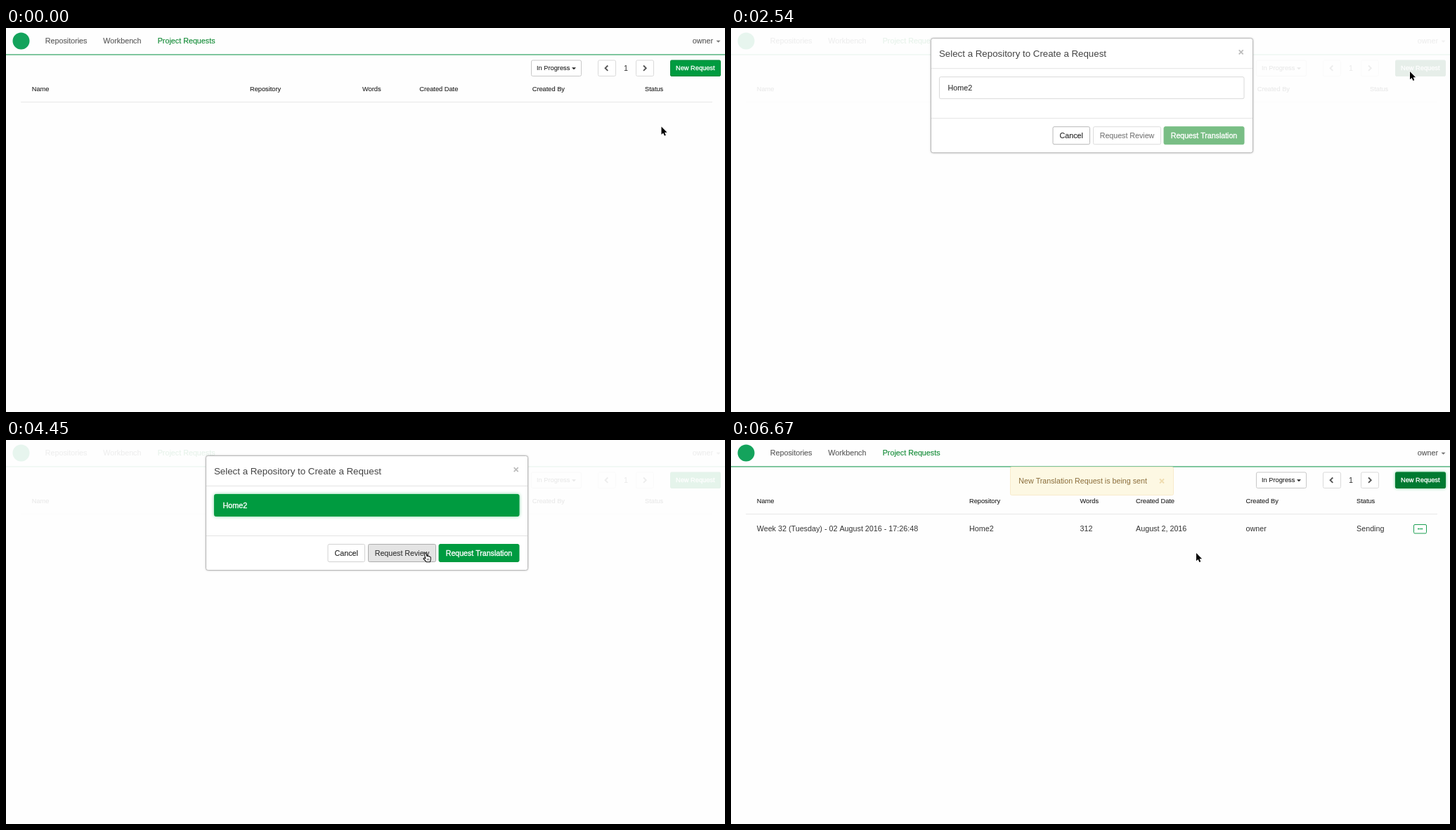
Write an HTML page with a canvas that moves like this. It is 1023x547 px and loops after 8000 ms.

```html
<!DOCTYPE html>
<html lang="en">
<head>
<meta charset="utf-8">
<title>Project Requests</title>
<style>
html, body { margin: 0; width: 100%; height: 100%; overflow: hidden; background: #fefefe; }
canvas { display: block; }
</style>
</head>
<body>
<canvas id="stage" width="1023" height="547"></canvas>
<script>
const W = 1023, H = 547, LOOP = 8000;
const ctx = document.getElementById('stage').getContext('2d');
const BODY = 10.75, SMALL = 9.25;
const GREEN = '#009b40', DARK = '#0c5c2b', FOCUS = '#007a31', BLUE = '#22a7ea';
const REPO = 'Home2', USER = 'owner';

const HAND = new Path2D('M-1 1.2Q.2-.6 1.4 1L3 5Q4.2 4.2 5 5.2Q6.2 4.6 6.8 5.8Q8.3 5.6 8.3 7.2Q8.6 10 7.2 13.3L2.2 13.3Q1 11.4-1.8 9Q-2.3 7.4-.6 7.6L.9 8.5Z');
const ARROW = new Path2D('M0 0V11.3L2.6 9L4.4 13L6.3 12.2L4.6 8.2H8.1Z');

// start, step length, steps, from, to
const MOVES = [
  [600, 146.7, 4, [932.5, 140.5], [966, 62]],
  [2980, 148, 6, [966, 62], [552, 95.5]],
  [3860, 148, 1, [552, 95.5], [552, 101.5]],
  [4160, 145, 3, [552, 101.5], [596, 160.5]],
  [4600, 145, 3, [596, 160.5], [662, 161]]
];

function cursorAt(t) {
  let pos = MOVES[0][3];
  for (const [start, dt, n, a, b] of MOVES) {
    if (t < start) break;
    const p = Math.min(n, Math.floor((t - start) / dt + 0.01) + 1) / n;
    const e = p * p * (3 - 2 * p);
    pos = a.map((v, i) => v + (b[i] - v) * e);
  }
  return pos;
}

function text(str, x, y, color, size = BODY, weight = 0, align = 'left') {
  ctx.font = size + 'px "Liberation Sans", Arial, sans-serif';
  ctx.textAlign = align;
  ctx.fillStyle = ctx.strokeStyle = color;
  ctx.fillText(str, x, y);
  if (weight) {
    ctx.lineWidth = weight;
    ctx.strokeText(str, x, y);
  }
}

function box(x, y, w, h, fill, border, r = 2, glow, blur = 4) {
  ctx.save();
  ctx.beginPath();
  ctx.roundRect(x + 0.5, y + 0.5, w - 1, h - 1, r);
  if (glow) {
    ctx.shadowColor = glow;
    ctx.shadowBlur = blur;
  }
  ctx.fillStyle = fill;
  ctx.fill();
  ctx.shadowColor = 'transparent';
  ctx.lineWidth = 1;
  ctx.strokeStyle = border;
  ctx.stroke();
  ctx.restore();
}

function lines(color, width, ...paths) {
  ctx.strokeStyle = color;
  ctx.lineWidth = width;
  ctx.beginPath();
  for (const path of paths) path.forEach(([x, y], i) => i ? ctx.lineTo(x, y) : ctx.moveTo(x, y));
  ctx.stroke();
}

function rule(x1, x2, y, color) {
  ctx.fillStyle = color;
  ctx.fillRect(x1, y, x2 - x1, 1);
}

function caret(x, y, color) {
  ctx.fillStyle = color;
  ctx.beginPath();
  ctx.moveTo(x - 3, y);
  ctx.lineTo(x + 3, y);
  ctx.lineTo(x, y + 3);
  ctx.fill();
}

function cross(x, y, color) {
  lines(color, 1.8, [[x - 3, y - 3], [x + 3, y + 3]], [[x - 3, y + 3], [x + 3, y - 3]]);
}

function chevron(x, dir) {
  lines('#555', 1.9, [[x - dir * 2, 53.5], [x + dir * 1.7, 57.2], [x - dir * 2, 60.9]]);
}

function navbar() {
  ctx.fillStyle = '#14a35c';
  ctx.beginPath();
  ctx.arc(21.5, 18.5, 12, 0, 7);
  ctx.fill();
  text('Repositories', 55.7, 22, '#5c5c5c', BODY, 0.15);
  text('Workbench', 138.3, 22, '#5c5c5c', BODY, 0.15);
  text('Project Requests', 215.7, 22, '#118a35', BODY, 0.15);
  text(USER, 976.7, 22, '#5c5c5c', BODY, 0.15);
  caret(1013.5, 17.7, '#777');
  ctx.fillStyle = '#57b581';
  ctx.fillRect(0, 37.2, W, 1.5);
}

function toolbar(t) {
  box(747, 45.5, 72, 23.5, '#fff', '#c8c8c8');
  text('In Progress', 755, 60.4, '#222', SMALL, 0.1);
  caret(808, 56.3, '#222');
  box(842, 45.5, 26, 23.5, '#fff', '#dadada');
  chevron(854.3, -1);
  text('1', 882, 60.5, '#333', BODY, 0, 'center');
  box(896, 45.5, 26, 23.5, '#fff', '#dadada');
  chevron(909, 1);

  let fill = GREEN, edge = '#008a38', glow = null;
  if (t >= 2240 && t < 2680) {
    fill = DARK;
    edge = t < 2540 ? BLUE : DARK;
    if (t < 2540) glow = BLUE;
  } else if (t >= 6230) {
    fill = edge = FOCUS;
    glow = '#4fc17d';
  }
  box(945, 45.5, 72, 23.5, fill, edge, 1.5, glow);
  text('New Request', 980.8, 60.3, '#fff', SMALL, 0.3, 'center');
}

function table(filled) {
  const cols = filled ? [36.7, 339, 496.5, 576, 732.5, 890] : [36.7, 347, 507, 588.3, 748.7, 909];
  const heads = ['Name', 'Repository', 'Words', 'Created Date', 'Created By', 'Status'];
  heads.forEach((s, i) => text(s, cols[i], 90, '#222', SMALL, 0.1));
  rule(21, 1005, 105, '#e8e8e8');
  if (!filled) return;
  const row = ['Week 32 (Tuesday) - 02 August 2016 - 17:26:48', REPO, '312', 'August 2, 2016', USER, 'Sending'];
  row.forEach((s, i) => text(s, cols[i], 129.8, '#333', BODY));
  box(971, 120, 19, 13.5, '#fff', '#1c9f52', 1.5);
  ctx.fillStyle = GREEN;
  for (const x of [977.2, 979.7, 982.2]) ctx.fillRect(x, 125.7, 1.7, 1.7);
}

function notice() {
  box(397, 38, 233, 41, '#fdf8e3', '#f8ebcb');
  text('New Translation Request is being sent', 409.3, 62, '#8a6d3b', BODY - 0.05);
  cross(613, 58.5, '#efdcb0');
}

function modal(t, x, y, dy, alpha) {
  const picked = t >= 4010, pressed = t >= 5490;
  const overRow = t >= 2980 && x < 730 && y < 109;
  const overReview = picked && y > 148 && x < 612;
  const overSend = picked && y > 148 && x > 616;

  ctx.save();
  ctx.globalAlpha = alpha;
  ctx.translate(0, dy);
  box(284, 22, 459, 164, '#fff', '#b9b9b9', 3, 'rgba(0,0,0,.35)', 3);
  text('Select a Repository to Create a Request', 296, 48.8, '#444', 13.3);
  cross(725.7, 42.2, '#bdbdbd');
  rule(285, 742, 65, '#e4e4e4');
  rule(285, 742, 136, '#e4e4e4');

  if (picked) box(296, 77, 434.5, 32, GREEN, GREEN, 2, pressed ? null : '#5fca8b', 5);
  else box(296, 77, 434.5, 32, overRow ? '#f3f3f3' : '#fff', '#d9d9d9', 2);
  text(REPO, 308.6, 97, picked ? '#fff' : '#333', BODY, picked ? 0.35 : 0.1);

  box(457.5, 148, 53.5, 26, '#fff', picked ? '#d2d2d2' : '#b8b8b8');
  text('Cancel', 484.2, 164.8, '#222', BODY, 0.1, 'center');
  box(515, 148, 97, 26, overReview ? '#e4e4e4' : '#fff', overReview ? '#adadad' : picked ? '#cdcdcd' : '#dcdcdc');
  text('Request Review', 563.5, 164.8, picked ? '#333' : '#777', BODY - 0.1, 0.1, 'center');

  const fill = pressed ? DARK : overSend ? FOCUS : picked ? GREEN : '#79be85';
  box(615.5, 148, 115, 26, fill, pressed ? BLUE : fill, 2, pressed ? BLUE : null);
  text('Request Translation', 673, 164.8, '#fff', BODY - 0.15, 0.35, 'center');
  ctx.restore();
}

function pointer(t, x, y) {
  const hand = t < 2390 ? t >= 893 && y < 70
    : t < 2980 ? false
    : t < 4160 ? x < 730
    : t < 6080 && y > 148 && (x < 612 || x > 616);
  ctx.save();
  ctx.translate(x, y);
  ctx.lineJoin = 'round';
  if (hand) {
    ctx.fillStyle = '#fff';
    ctx.fill(HAND);
    ctx.lineWidth = 1.1;
    ctx.strokeStyle = '#111';
    ctx.stroke(HAND);
    lines('#111', 0.7, [[3.4, 8.5], [3.7, 11]], [[5.3, 8.3], [5.4, 11]]);
  } else {
    ctx.lineWidth = 1.6;
    ctx.strokeStyle = '#fff';
    ctx.stroke(ARROW);
    ctx.fillStyle = '#000';
    ctx.fill(ARROW);
  }
  ctx.restore();
}

function draw(t) {
  const [x, y] = cursorAt(t);
  ctx.fillStyle = '#fefefe';
  ctx.fillRect(0, 0, W, H);
  navbar();
  toolbar(t);
  table(t >= 6670);
  if (t >= 6230) notice();

  if (t >= 2390 && t < 6230) {
    ctx.fillStyle = `rgba(254,254,254,${t < 2540 ? 0.5 : 0.9})`;
    ctx.fillRect(0, 0, W, H);
    const leaving = t >= 6080;
    if (t >= 2540) modal(t, x, y, t < 2680 || leaving ? -7.8 : 0, leaving ? 0.4 : 1);
  }
  pointer(t, x, y);
}

const begin = performance.now();
function tick() {
  draw((performance.now() - begin) % LOOP);
  requestAnimationFrame(tick);
}
tick();
</script>
</body>
</html>
```
